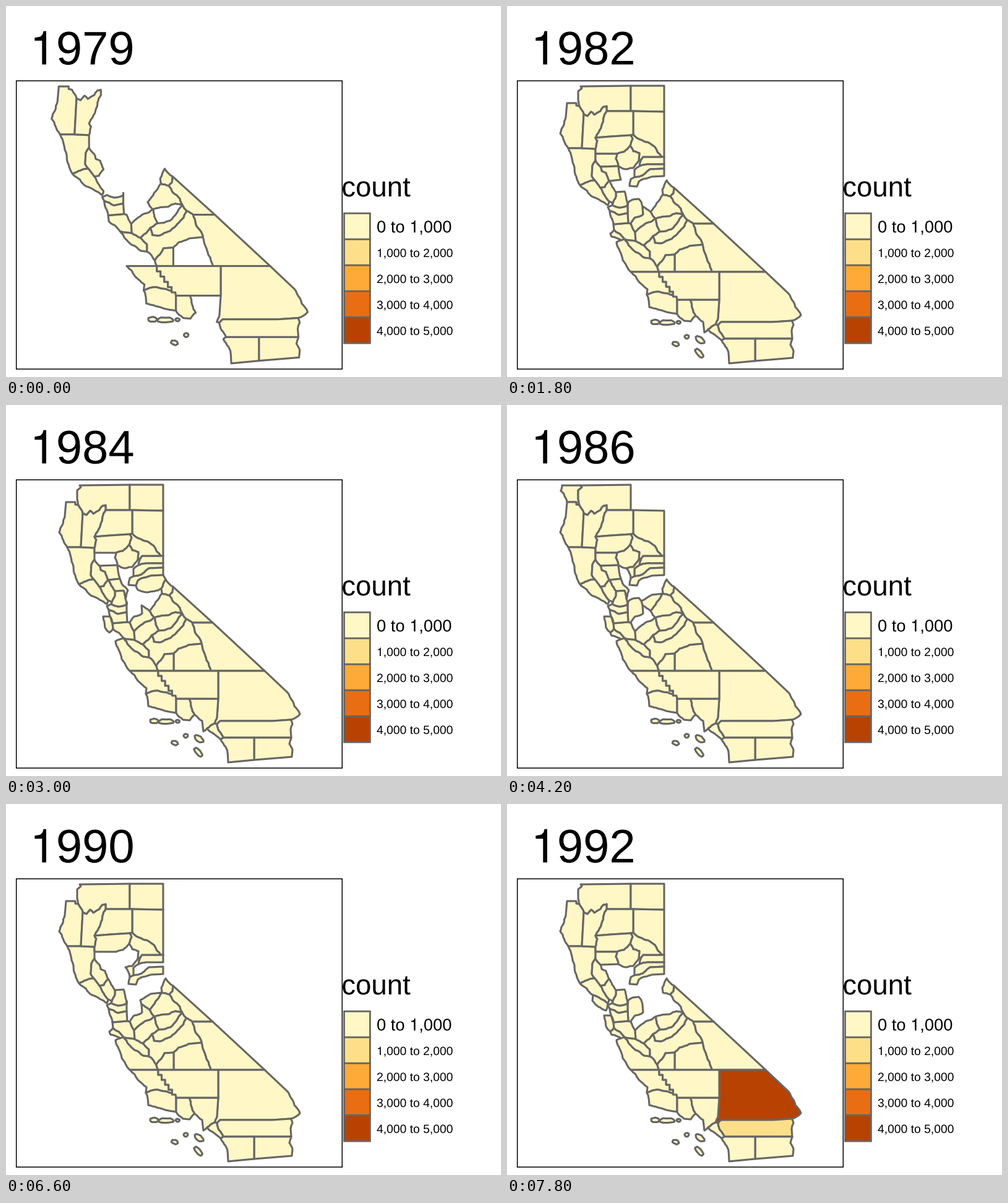
A matplotlib script for the animation above (8000 ms loop, 800 px wide and 600 px high).

```python
import math
import random
from itertools import combinations

import matplotlib.pyplot as plt
import numpy as np
from matplotlib.animation import FuncAnimation
from matplotlib.patches import PathPatch, Polygon, Rectangle
from matplotlib.path import Path
from matplotlib.textpath import TextPath

W, H, DPI = 800, 600, 100
PX = 72 / DPI
STEP, HOLD = 200, 600
FIRST = 1979
GRAY = "#666666"
SHADES = ["#FFF7C6", "#FEDF89", "#FEAA38", "#E96E13", "#B74202"]

rng = random.Random(7)
corners = {}  # region pair -> the points where both meet a third region
bends = {}    # region pair -> key points along their border
isles = {}


def corner(regions, x, y):
    for pair in combinations(sorted(regions.split()), 2):
        corners.setdefault(pair, []).append((x, y))


def bend(pair, *nums):
    bends[tuple(sorted(pair.split()))] = list(zip(nums[::2], nums[1::2]))


def wiggle(a, b):
    """Midpoint displacement; survey lines stay straight."""
    dx, dy = b[0] - a[0], b[1] - a[1]
    size = math.hypot(dx, dy)
    if size < 5 or size > 50 or min(abs(dx), abs(dy)) < 0.12 * size:
        return [b]
    off = rng.uniform(-0.08, 0.08)
    mid = ((a[0] + b[0]) / 2 - dy * off, (a[1] + b[1]) / 2 + dx * off)
    return wiggle(a, mid) + wiggle(mid, b)


def stairs(a, b, n=6):
    xs, ys = np.linspace(a[0], b[0], n), np.linspace(a[1], b[1], n)
    return [p for i in range(1, n) for p in ((xs[i - 1], ys[i]), (xs[i], ys[i]))]


def border(pair):
    a, b = corners[pair]
    via = bends.get(pair, [])
    if via:
        ahead = math.dist(a, via[0]) + math.dist(via[-1], b)
        if math.dist(b, via[0]) + math.dist(via[-1], a) < ahead:
            a, b = b, a
    stops = [a, *via, b]
    piece = stairs if pair == ("KER", "SLO") else wiggle
    line = [a]
    for p, q in zip(stops, stops[1:]):
        line += piece(p, q)
    return line


def ring(parts):
    """Chain borders end to end into one outline."""
    todo = list(parts)
    path = list(todo.pop(0))
    while todo:
        ways = [(math.dist(path[-1], p[0]), i, 1) for i, p in enumerate(todo)]
        ways += [(math.dist(path[-1], p[-1]), i, -1) for i, p in enumerate(todo)]
        _, i, way = min(ways)
        path += todo.pop(i)[::way][1:]
    return path


def isle(owner, x, y, rx, ry, turn=0):
    t = np.linspace(0, 2 * np.pi, 12, endpoint=False)
    r = np.array([rng.uniform(0.85, 1.1) for _ in t])
    u, v = rx * r * np.cos(t), ry * r * np.sin(t)
    c, s = math.cos(math.radians(turn)), math.sin(math.radians(turn))
    isles.setdefault(owner, []).append(np.column_stack([x + u * c - v * s, y + u * s + v * c]))


# Upper case names are counties, lower case ones are what lies outside.
# state line
corner("DNO sea ore", 89, 130)
corner("DNO SIS ore", 119, 130)
corner("SIS MOD ore", 200, 129)
corner("MOD ore nev", 254, 129)
corner("MOD LAS nev", 254, 171)
corner("LAS SIE nev", 254, 244)
corner("SIE NEV nev", 254, 256)
corner("NEV PLA nev", 254, 263)
corner("PLA ELD nev", 254, 275)
corner("ELD ALP nev", 258, 282)
corner("ALP MON nev", 270, 294)
corner("MON INY nev", 334, 352)
corner("INY SBD nev", 418, 430)
corner("SBD RIV nev", 460, 509)
corner("RIV IMP nev", 461, 538)
corner("IMP nev mex", 462, 569)
corner("IMP SDG mex", 401, 574)
corner("SDG mex sea", 359, 578)
bend("SBD nev", 455, 465, 466, 487, 475, 500)
bend("IMP nev", 458, 548, 463, 558)
bend("RIV nev", 463, 516, 460, 525)

# coast
corner("DNO HUM sea", 97, 157)
corner("HUM MEN sea", 99, 230)
corner("MEN SON sea", 118, 290)
corner("SON MRN sea", 139, 309)
corner("MRN sea bay", 160, 334)
corner("SMA sea bay", 157, 342)
corner("SMA SCZ sea", 167, 368)
corner("SCZ SCL SBT MNT sea", 190, 377)
corner("MNT SLO sea", 200, 430)
corner("SLO SBA sea", 226, 467)
corner("SBA VEN sea", 275, 498)
corner("VEN LAX sea", 305, 501)
corner("LAX ORA sea", 325, 523)
corner("ORA SDG sea", 347, 541)
bend("DNO sea", 87, 139, 92, 144)
bend("HUM sea", 95, 180, 86, 206)
bend("MEN sea", 109, 261)
bend("MRN sea", 138, 318, 148, 328)
bend("SMA sea", 160, 360)
bend("SCZ sea", 169, 373, 186, 380)
bend("MNT sea", 177, 382, 187, 411)
bend("SLO sea", 213, 446, 227, 458)
bend("SBA sea", 258, 495, 230, 487)
bend("VEN sea", 286, 509, 297, 510)
bend("LAX sea", 317, 511, 319, 528)
bend("SDG sea", 355, 553)

# north
corner("DNO HUM SIS", 117, 162)
corner("HUM SIS TRI", 124, 175)
corner("SIS TRI SHA", 161, 170)
corner("SIS MOD SHA", 200, 170)
corner("MOD SHA LAS", 204, 170)
corner("HUM TRI MEN", 121, 230)
corner("TRI SHA TEH", 143, 213)
corner("TRI TEH MEN", 143, 231)
corner("SHA TEH PLU", 200, 209)
corner("SHA LAS PLU", 204, 208)
corner("LAS PLU SIE", 250, 244)
corner("MEN TEH GLE", 143, 239)
corner("TEH GLE BUT", 178, 239)
corner("TEH PLU BUT", 199, 226)
corner("BUT PLU YUB", 213, 250)
corner("PLU YUB SIE", 217, 248)
corner("SIE YUB NEV", 214, 259)
corner("NEV YUB PLA", 206, 277)
bend("DNO SIS", 121, 133, 115, 138, 115, 150)
bend("DNO HUM", 112, 157, 112, 161)
bend("SIS TRI", 130, 178, 136, 171, 141, 176, 151, 170, 156, 163, 161, 162)
bend("TRI SHA", 153, 193)
bend("TRI TEH", 146, 218)
bend("SHA TEH", 168, 211)
bend("LAS PLU", 215, 216, 239, 228)
bend("TEH PLU", 203, 215)
bend("TEH BUT", 189, 236)
bend("BUT PLU", 204, 235, 214, 238)
bend("BUT YUB", 204, 262)
bend("BUT GLE", 176, 247)
bend("PLU SIE", 220, 244)
bend("SIE NEV", 226, 256)
bend("NEV YUB", 206, 265)
bend("NEV PLA", 214, 276, 231, 264)

# valley and bay
corner("GLE COL BUT gap", 180, 259)
corner("BUT YUB gap", 193, 264)
corner("YUB PLA gap", 200, 280)
corner("PLA ELD gap", 210, 292)
corner("ELD ALP gap", 251, 297)
corner("ALP CAL TUO gap", 252, 305)
corner("SJO CAL gap", 217, 317)
corner("CCO SJO gap", 195, 319)
corner("SOL CCO gap", 195, 322)
corner("YOL SOL gap", 193, 313)
corner("COL YOL gap", 184, 281)
corner("MEN GLE LAK", 143, 250)
corner("GLE COL LAK", 151, 260)
corner("LAK NAP COL YOL", 165, 283)
corner("LAK NAP SON", 151, 294)
corner("MEN LAK SON", 142, 282)
corner("NAP YOL SOL", 176, 301)
corner("SON NAP bay", 165, 316)
corner("NAP SOL bay", 171, 319)
corner("SOL CCO bay", 170, 322)
corner("SON MRN bay", 163, 322)
corner("CCO ALA bay", 166, 331)
corner("CCO ALA SJO", 195, 335)
corner("SMA SCL ALA bay", 172, 353)
corner("ALA SCL SJO", 196, 351)
corner("SMA SCL SCZ", 173, 362)
bend("PLA gap", 198, 291)
bend("PLA ELD", 213, 284, 234, 276)
bend("ELD gap", 228, 303, 213, 299)
bend("CAL gap", 234, 307)
bend("SJO gap", 201, 314, 213, 312)
bend("YOL gap", 187, 289, 197, 300)
bend("YOL SOL", 190, 300)
bend("MEN LAK", 138, 258, 137, 275)
bend("COL LAK", 153, 267, 160, 270)
bend("LAK NAP", 158, 293)
bend("NAP SOL", 176, 308)
bend("SOL CCO", 181, 326)
bend("CCO bay", 163, 325)
bend("CCO ALA", 181, 338)
bend("SMA bay", 168, 342)

# middle
corner("SCL SJO STA", 200, 352)
corner("SCL STA MER", 207, 366)
corner("SCL MER SBT", 208, 380)
corner("SJO CAL STA", 219, 324)
corner("CAL STA TUO", 232, 333)
corner("ALP MON TUO", 264, 308)
corner("STA TUO MER MPA", 240, 344)
corner("TUO MPA MAD MON", 285, 338)
corner("MER MPA MAD", 247, 365)
corner("MER MAD FRE", 236, 372)
corner("MER SBT FRE", 221, 387)
corner("MAD MON FRE", 291, 346)
corner("MON FRE INY", 301, 352)
corner("FRE INY TUL", 316, 386)
corner("FRE TUL KNG", 271, 402)
corner("FRE SBT MNT", 231, 408)
corner("FRE KNG MNT", 243, 422)
corner("INY TUL KER", 331, 430)
corner("INY KER SBD", 343, 430)
corner("KNG TUL KER", 271, 430)
corner("KNG MNT SLO KER", 246, 430)
bend("SJO STA", 220, 337, 207, 342)
bend("STA MER", 218, 356)
bend("ALP MON", 269, 303)
bend("TUO MON", 270, 318, 281, 328)
bend("TUO MPA", 263, 340, 274, 335)
bend("MPA MAD", 266, 361)
bend("MAD FRE", 239, 383, 248, 384, 267, 376, 287, 356)
bend("FRE INY", 305, 366)
bend("FRE TUL", 295, 388, 279, 394)
bend("FRE KNG", 256, 403)
bend("FRE SBT", 231, 397)
bend("INY TUL", 322, 406)
bend("SBT MNT", 208, 398, 222, 407)

# south
corner("SLO SBA KER", 274, 470)
corner("SBA KER VEN", 275, 475)
corner("KER VEN LAX", 296, 475)
corner("KER LAX SBD", 343, 475)
corner("LAX ORA SBD", 337, 515)
corner("ORA SBD RIV", 341, 516)
corner("ORA RIV SDG", 351, 538)
corner("RIV SDG IMP", 401, 538)
bend("SLO SBA", 245, 462)
bend("LAX SBD", 341, 505)
bend("SBD RIV", 346, 511, 430, 511)

isle("SBA", 239.5, 511, 7.5, 4)
isle("SBA", 259, 512, 12.5, 4)
isle("SBA", 277.5, 511.5, 3.5, 2.5)
isle("SBA", 290.5, 535, 3.4, 3.2)
isle("VEN", 272.5, 546.5, 5.5, 3.4, 20)
isle("LAX", 312, 540, 8, 4.5, 35)
isle("LAX", 310.5, 561, 9, 4, 48)

MISSING = {
    1979: "DNO SIS MOD SHA LAS TEH PLU GLE BUT SIE NEV PLA ELD YUB COL YOL NAP "
          "SOL MRN SMA SCZ SJO STA CAL MPA MNT TUL LAX ORA",
    1980: "DNO YUB ELD CAL SMA MRN YOL LAX",
    1981: "DNO YUB ELD CAL MRN YOL",
    1982: "DNO YUB ELD CAL SMA MRN YOL",
    1983: "DNO YUB ELD CAL MRN YOL",
    1984: "DNO GLE YUB CAL SJO SCZ MRN",
    1985: "YUB CAL ELD",
    1986: "MOD ELD STA MRN",
    1987: "DNO YUB ELD STA CAL MRN YOL COL",
    1988: "SHA COL YUB PLA ELD YOL CAL SJO STA TUO MRN",
    1989: "DNO COL ELD YOL SJO MRN YUB",
    1990: "DNO GLE BUT COL NEV ELD SJO YOL SMA MRN",
    1991: "COL ELD YOL",
    1992: "DNO COL YUB ELD CAL STA TUO YOL",
}
LEVELS = {(1992, "SBD"): 4, (1992, "RIV"): 1}

# numeral one without a foot
ONE = Path([(.259, 0), (.347, 0), (.347, .709), (.289, .709), (.27, .64), (.22, .59),
            (.102, .568), (.102, .505), (.259, .505), (.259, 0)], closed=True)
ADVANCE = {",": .278, " ": .278, "t": .278, "c": .5}


def text_path(x, y, size, s):
    parts = []
    for ch in s:
        glyph = ONE if ch == "1" else TextPath(
            (0, 0), ch, size=1, prop={"family": "Liberation Sans"})
        if len(glyph.vertices):
            parts.append(Path(glyph.vertices * [size, -size] + [x, y], glyph.codes))
        x += ADVANCE.get(ch, .556) * size
    return Path.make_compound_path(*parts)


def year_path(year):
    return text_path(38.6, 94.5, 76, str(year))


def write(*args):
    ax.add_patch(PathPatch(text_path(*args), fc="black", lw=0))


def box(x, y, w, h, fill, line, width):
    ax.add_patch(Rectangle((x, y), w, h, fc=fill, ec=line, lw=width * PX, snap=False))


fig = plt.figure(figsize=(W / DPI, H / DPI), dpi=DPI, facecolor="white")
ax = fig.add_axes([0, 0, 1, 1])
ax.set(xlim=(0, W), ylim=(H, 0))
ax.axis("off")

box(16.7, 121, 526.6, 466.2, "none", "black", 1.5)
title = ax.add_patch(PathPatch(year_path(FIRST), fc="black", lw=0))
write(542.2, 308, 45.6, "count")
for i, shade in enumerate(SHADES):
    top = 335.3 + 42 * i
    box(546.4, top, 42, 42, shade, GRAY, 2.8)
    if i == 0:
        write(599, top + 31, 27.3, "0 to 1,000")
    else:
        write(599, top + 70.7 - 42, 19.3, f"{i},000 to {i + 1},000")

outlines = {}
for pair in corners:
    if len(corners[pair]) == 2:
        line = border(pair)
        for name in filter(str.isupper, pair):
            outlines.setdefault(name, []).append(line)

shapes = []
for name, parts in outlines.items():
    for pts in [ring(parts)] + isles.get(name, []):
        patch = Polygon(pts, closed=True, ec=GRAY, lw=3.1 * PX, joinstyle="round")
        ax.add_patch(patch)
        shapes.append((name, np.array(pts, float), patch))


def draw(frame):
    year = FIRST + frame * STEP // HOLD
    title.set_path(year_path(year))
    gone = MISSING[year].split()
    # without the northern counties the map is zoomed to fit
    zoom = 1.064 if year == FIRST else 1
    for name, pts, patch in shapes:
        patch.set_visible(name not in gone)
        patch.set_xy((pts - [280, 578]) * zoom + [280, 578])
        patch.set_facecolor(SHADES[LEVELS.get((year, name), 0)])
    return [title] + [patch for _, _, patch in shapes]


anim = FuncAnimation(fig, draw, frames=40, interval=STEP, repeat=True,
                     repeat_delay=0, blit=False)
plt.show()
```
